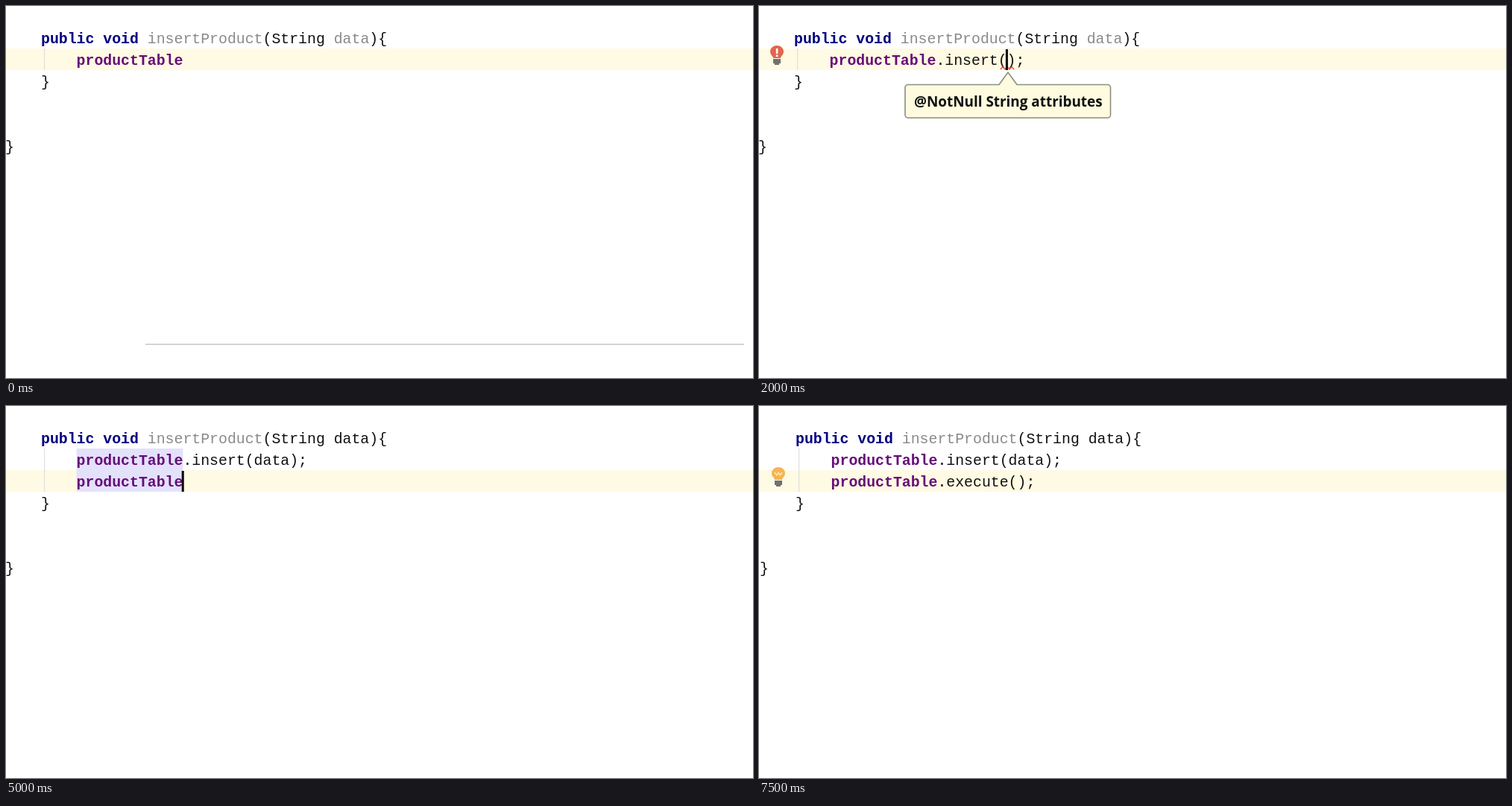
Animation, 1002 px wide and 499 px high, one loop 8000 ms. Source, as an HTML page:

```html
<!DOCTYPE html>
<html lang="en">
<head>
<meta charset="utf-8">
<title>Code completion</title>
<style>
  html, body { margin: 0; width: 100%; height: 100%; overflow: hidden; background: #fff; }
  svg { display: block; }
  text { white-space: pre; }
  .code { font: 19.83px "Courier New", "Liberation Mono", monospace; fill: #111; }
  .kw { font-weight: bold; fill: #000080; }
  .field { font-weight: bold; fill: #660e7a; }
  .dim { fill: #8a8a8a; }
  .item { fill: #606468; }
  .hit { fill: #b84ccb; }
  .ui { font: 16.2px "Open Sans", "Noto Sans", sans-serif; fill: #111; }
  .tip { font: bold 18.9px "Open Sans", "Noto Sans", sans-serif; fill: #111; }
  .badge { font: bold 15px "Open Sans", sans-serif; fill: #75696b; text-anchor: middle; }
  .end { text-anchor: end; }
  .line { fill: none; stroke-linejoin: round; }
</style>
</head>
<body>
<svg id="stage" width="1002" height="499" viewBox="0 0 1002 499"></svg>
<script>
(() => {
const STEP = 500, CHAR = 11.9, LEFT = 47, PITCH = 29, ROW = 32.3;
const MEMBERS = ['select()|void', 'exist(String key)|boolean', 'isEmpty()|boolean', 'printSql()|void',
  'equals(Object obj)|boolean', 'hashCode()|int', 'toString()|String', 'count(ResultSet result)|int',
  'delete()|void', 'execute()|boolean', 'fetch()|ResultSet'];
const [SELECT, EXIST, EMPTY, PRINT, EQUALS, HASH, STRING, , DELETE, EXECUTE, FETCH] = MEMBERS;
const INSERT = 'insert(String attributes)|void';
const BADGES = { m: '#f5bfbc', p: '#f3d3ae', f: '#f3d3ae', C: '#b5d9ee' };

const rect = (x, y, w, h, fill, more = '') =>
  `<rect x="${x}" y="${y}" width="${w}" height="${h}" fill="${fill}" ${more}/>`;
const text = (x, y, cls, s) => `<text x="${x}" y="${y}" class="${cls}">${s}</text>`;
const span = (cls, s) => `<tspan class="${cls}">${s}</tspan>`;
const col = n => LEFT + n * CHAR;
const base = line => 50 + (line - 1) * PITCH;
const lineTop = line => 57 + (line - 2) * PITCH;

const caret = (n, line) => rect(col(n) - 1.7, lineTop(line) + 1, 3, 28, '#000');
const mark = (n, line, len) => rect(col(n), lineTop(line), len * CHAR, PITCH, '#e4e1fb');

function squiggle(x, line, waves) {
  const y = lineTop(line) + 28;
  return `<path class="line" stroke="#e0493c" stroke-width="1.4" d="M${x} ${y}${'l3-3.5 3 3.5'.repeat(waves)}"/>`;
}

function bulb(x, y, red) {
  const fill = red ? '#e2654f' : '#f5b553';
  const sign = red
    ? rect(x - 1.2, y - 6, 2.6, 7, '#fff') + rect(x - 1.2, y + 2.5, 2.6, 2.6, '#fff')
    : `<path class="line" stroke="#fde3b4" stroke-width="1.5" d="M${x - 5} ${y - 3}l3 4 2-4 2 4 3-4"/>`;
  return `<path fill="${fill}" d="M${x - 5} ${y + 7}c0-3-4-4-4-9a9 8 0 0 1 18 0c0 5-4 6-4 9z"/>` + sign +
    rect(x - 5, y + 8, 10, 6, '#707070') + rect(x - 3, y + 14, 6, 2, '#707070');
}

function lock(x, y, chosen) {
  const c = chosen ? '#8fc0a4' : '#97d0a2';
  return `<path class="line" stroke="${c}" stroke-width="1.8" d="M${x} ${y}v-3.5a3.3 3.3 0 0 1 6.6 0v3"/>` +
    rect(x + 4.5, y - 1, 10, 9, c) + rect(x + 8.5, y + 1.5, 2, 3.5, '#e8f3f4');
}

function tooltip() {
  return `<path fill="#fefbdf" stroke="#8c8c80" stroke-width="1.6" stroke-linejoin="round"
    d="M200 105.5H322L334 89 346 105.5H467.5a4 4 0 0 1 4 4V146a4 4 0 0 1-4 4H200a4 4 0 0 1-4-4V109.5a4 4 0 0 1 4-4z"/>` +
    text(208, 135, 'tip', '@NotNull String attributes');
}

// Completion list under a line; a tall list has a scroll bar.
function popup({ x = 187, line, right = 967, items, typed = '', tall }) {
  const y = lineTop(line) + PITCH + 1;
  const h = tall ? 340 : ROW * items.length;
  const edge = tall ? right + 23 : right;
  let out = rect(x, y, right - x, h, '#ebf4fe') + rect(x + 1, y + 1, right - x - 2, ROW, '#a0b7c7');
  items.forEach((item, i) => {
    let [name, type] = item.split('|'), kind = 'm';
    if (name[1] === ':') { kind = name[0]; name = name.slice(2); }
    const ry = y + i * ROW;
    const at = typed ? name.toLowerCase().indexOf(typed) : -1;
    const end = at + typed.length;
    const label = at < 0 ? name : name.slice(0, at) + span('hit', name.slice(at, end)) + name.slice(end);
    out += `<circle cx="${x + 18.5}" cy="${ry + 16.5}" r="11.3" fill="${BADGES[kind]}" stroke="#e5a9a6" stroke-width=".8"/>` +
      text(x + 18.5, ry + 21, 'badge', kind);
    if (kind !== 'p') out += lock(x + 38, ry + 17, !i);
    out += text(x + 62.5, ry + 23.5, 'code item', label) + text(right - 12, ry + 23.5, 'code item end', type);
  });
  const fy = y + h;
  out += rect(x, fy, edge - x, 25.5, '#e9e9e9') +
    text(x + 3, fy + 18, 'ui', 'Ctrl+Giù and Ctrl+Su will move caret down and up in the editor') +
    `<text x="${x + 486}" y="${fy + 18}" class="ui" style="fill:#1a1aff;letter-spacing:2px;text-decoration:underline">&gt;&gt;</text>`;
  if (tall) {
    out += rect(right, y, 22, h, '#f3f3f3') + rect(right + 1, y + 1, 19, 74, '#d3d3d3') +
      rect(right + 1, fy + .5, 21, 24, '#dce9f3', 'stroke="#b9c4cc"') +
      `<text x="${right + 12}" y="${fy + 19}" class="ui" style="font-size:20px;fill:#3c84b4;text-anchor:middle">π</text>`;
  }
  return out + rect(x + .5, y - .5, edge - x, h + 26, 'none', 'stroke="#bfc3c6" stroke-width="1.4"') +
    rect(0, 475, 1002, 24, '#fff');
}

const call = rest => span('field', 'productTable') + rest;

// One editor view: body lines, text behind the caret line, layers in front.
function view({ body, used, marks = '', over = '', dx = 0 }) {
  const now = body.length + 1, close = now + 1;
  const head = span('kw', 'public void ') + span('dim', 'insertProduct') + '(String ' +
    (used ? 'data' : span('dim', 'data')) + '){';
  return rect(0, lineTop(now), 1002, PITCH, '#fffae3') + `<g transform="translate(${dx})">` + marks +
    rect(51, lineTop(2), 1.2, PITCH * body.length, '#dedede') +
    text(LEFT, base(1), 'code', head) +
    body.map((s, i) => text(col(4), base(i + 2), 'code', s)).join('') +
    text(LEFT, base(close), 'code', '}') + text(-1, base(close + 3), 'code', '}') + over + '</g>';
}

const done = call('.insert(data);');
const twice = mark(4, 2, 12) + mark(4, 3, 12);
const filled = view({ body: [done], used: true,
  marks: mark(33, 1, 4) + mark(24, 2, 4), over: caret(28, 2) });

const views = [
  view({ body: [call('')], over: rect(187, 453, 803, 1.5, '#c6c6c6') }),
  view({ body: [call('.')], over: popup({ line: 2, items: MEMBERS, tall: true }) }),
  view({ body: [call('.i')], over: popup({ line: 2, tall: true, typed: 'i',
    items: [INSERT, EMPTY, EXIST, PRINT, STRING, 'notify()|void', 'notifyAll()|void', 'wait()|void',
      'wait(long timeout)|void', 'wait(long timeout, int nanos)|void', 'finalize()|void'] }) }),
  view({ body: [call('.in')], over: caret(19, 2) + popup({ line: 2, typed: 'in',
    items: [INSERT, 'index()|int', PRINT, STRING, 'finalize()|void', 'join(String key)|void', 'min(String key)|int'] }) }),
  view({ body: [call('.insert();')],
    over: squiggle(324, 2, 3) + caret(24, 2) + bulb(24, 63, true) + tooltip() }),
  view({ body: [call('.insert(da);')], over: caret(26, 2) + popup({ x: 269, line: 2, right: 981, typed: 'da',
    items: ['p:data|String', 'C:Date|java.util', 'C:DataInput|java.io', 'C:DataOutput|java.io', 'C:DataSource|javax.sql'] }) }),
  filled,
  filled,
  view({ body: [done, ''], used: true }),
  view({ body: [done, 'product'], used: true, over: caret(11, 3) + popup({ x: 32, line: 3, right: 743, typed: 'product',
    items: ['f:productTable|ProductTable', 'insertProduct(String data)|void'] }) }),
  view({ body: [done, call('')], used: true, marks: twice, over: caret(16, 3) }),
  view({ body: [done, call('.')], used: true, marks: twice,
    over: squiggle(249, 3, 2) + popup({ line: 3, items: [INSERT, ...MEMBERS.filter(m => m !== PRINT)], tall: true }) }),
  view({ body: [done, call('.e')], used: true, over: caret(18, 3) + popup({ line: 3, tall: true, typed: 'e',
    items: [EXIST, EQUALS, EXECUTE, INSERT, SELECT, EMPTY, HASH, DELETE, FETCH, 'getClass()|Class', 'finalize()|void'] }) }),
  view({ body: [done, call('.ex')], used: true,
    over: squiggle(277, 3, 1) + caret(19, 3) + popup({ line: 3, typed: 'ex', items: [EXIST, EXECUTE] }) }),
  view({ body: [done, call('.execute();')], used: true }),
  view({ body: [done, call('.execute();')], used: true, dx: 2, over: bulb(24, 92, false) })
];

const stage = document.getElementById('stage');
let shown = -1;
function draw() {
  const i = Math.floor(performance.now() / STEP) % views.length;
  if (i !== shown) stage.innerHTML = views[shown = i];
  requestAnimationFrame(draw);
}
draw();
})();
</script>
</body>
</html>
```
